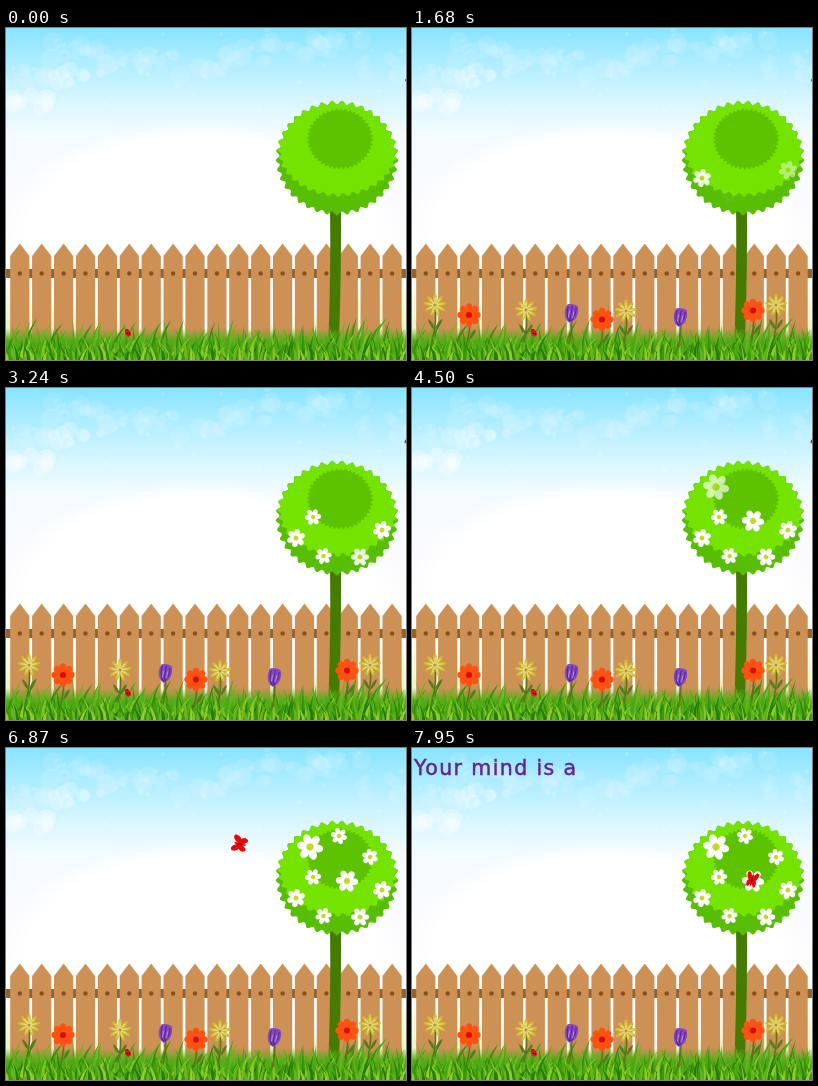
An HTML page for the animation above (8 s loop, 400 by 332 pixels).

```html
<!DOCTYPE html>
<html lang="en">
<head>
<meta charset="utf-8">
<title>Garden</title>
<style>
html, body { margin: 0; width: 100%; height: 100%; overflow: hidden; background: #fff; }
svg { display: block; width: 400px; height: 332px; }
text { font: 20.5px "DejaVu Sans", sans-serif; letter-spacing: 1.4px; fill: #662391; stroke: #662391; stroke-width: .5; white-space: pre; }
</style>
</head>
<body>
<svg viewBox="0 0 400 332" xmlns="http://www.w3.org/2000/svg">
  <defs>
    <linearGradient id="sky" x1="0" y1="0" x2="0" y2="1">
      <stop offset="0" stop-color="#88e4ff"/>
      <stop offset=".12" stop-color="#b4eeff"/>
      <stop offset=".22" stop-color="#d8f6ff"/>
      <stop offset=".32" stop-color="#f3fbff"/>
      <stop offset=".5" stop-color="#fafaff"/>
      <stop offset=".76" stop-color="#fdfefa"/>
      <stop offset=".93" stop-color="#e6f5bd"/>
    </linearGradient>
    <radialGradient id="glow">
      <stop offset=".85" stop-color="#fff"/>
      <stop offset="1" stop-color="#fff" stop-opacity="0"/>
    </radialGradient>
    <linearGradient id="soil" x1="0" y1="0" x2="0" y2="1">
      <stop offset="0" stop-color="#5cab1c" stop-opacity="0"/>
      <stop offset=".4" stop-color="#56ab18"/>
      <stop offset="1" stop-color="#3f9a0c"/>
    </linearGradient>
    <clipPath id="crownClip"><path id="crownEdge"/></clipPath>
  </defs>
  <rect width="400" height="332" fill="url(#sky)"/>
  <ellipse cx="195" cy="205" rx="205" ry="112" fill="url(#glow)"/>
  <g id="clouds" fill="#fff"></g>
  <g id="fence"></g>
  <g id="tree"></g>
  <g id="daisies"></g>
  <g id="grass"></g>
  <g id="bed"></g>
  <g id="fly">
    <g id="wings" fill="#e8080c">
      <path id="wing" d="M0 1C-1 -7 -6 -9 -8 -7C-9 -4 -7 -1 -5 0C-8 2 -7 6 -5 7C-3 7 -1 4 0 1Z"/>
      <use href="#wing" transform="scale(-1 1)"/>
    </g>
    <path d="M0 -5V5" stroke="#a80808" stroke-width="1.6" stroke-linecap="round"/>
  </g>
  <text id="words" x="2" y="26.5"></text>
</svg>
<script>
const LOOP = 8000, STEP = 30, TAU = Math.PI * 2;
const $ = id => document.getElementById(id);
const clamp = v => Math.max(0, Math.min(1, v));
const span = (t, a, b) => clamp((t - a) / (b - a));
const n1 = v => v.toFixed(1);

let seed = 11;
function rnd(a = 0, b = 1) {
  seed = (seed * 16807) % 2147483647;
  return a + (b - a) * seed / 2147483647;
}
const times = (n, fn) => Array.from({ length: n }, (_, i) => fn(i)).join('');
const dot = (x, y, r, extra = '') =>
  `<circle cx="${n1(x)}" cy="${n1(y)}" r="${n1(r)}" ${extra}/>`;

// Sky
const puff = (x, y, w, o) => times(9, () =>
  dot(x + rnd(-w, w), y + rnd(-w, w) * .4, rnd(4, 10), `opacity="${o}"`));
$('clouds').innerHTML = puff(76, 48, 28, .24) + puff(24, 73, 18, .32) +
  times(9, i => puff(20 + i * 45, rnd(14, 52), 26, .11)) +
  times(45, () => dot(rnd(0, 400), rnd(0, 95), rnd(.8, 3), 'opacity=".18"'));

// Fence
$('fence').innerHTML = '<path d="M0 241H400V250H0Z" fill="#94602c"/>' + times(18, i => {
  const x = 13.8 + i * 21.9;
  return `<path d="M${n1(x - 9.6)} 320V228L${n1(x)} 215.5L${n1(x + 9.6)} 228V320Z" fill="#cd9156"/>` +
    dot(x, 245.5, 2.2, 'fill="#85501f"');
});

// Tree
function frill(cx, cy, rx, ry, bumps, depth) {
  const n = bumps * 8;
  const at = i => {
    const a = i / n * TAU, k = depth * Math.sin(a * bumps);
    return n1(cx + Math.cos(a) * (rx + k)) + ' ' + n1(cy + Math.sin(a) * (ry + k));
  };
  return 'M' + Array.from({ length: n }, (_, i) => at(i)).join('L') + 'Z';
}
const crown = frill(331, 130, 59.5, 55.5, 37, 1.9);
$('crownEdge').setAttribute('d', crown);
$('tree').innerHTML =
  '<path d="M324 180H335Q335.5 245 332.5 325H322Q325 245 324 180Z" fill="#457b00"/>' +
  `<path d="${crown}" fill="#58bd05"/>` +
  `<path d="${frill(332, 120, 59, 47, 37, 1.8)}" fill="#75e300" clip-path="url(#crownClip)"/>` +
  `<path d="${frill(334, 111, 32, 29.5, 44, 1.2)}" fill="#5dc300"/>`;

// Daisies: x, y, radius, start of fade
const FADE = 720;
const daisies = [
  [290, 150, 9, 1050], [376, 142, 9, 1350], [317.5, 168, 8, 1650],
  [307, 129, 8, 2160], [354, 169, 9, 2610], [341, 133, 11, 3570],
  [304, 99, 13, 4020], [333, 88, 8, 4560], [364, 109, 8, 5130]
];
const petals = (n, r, w, fill) => times(n, i =>
  `<ellipse cy="${n1(-r * .62)}" rx="${n1(w)}" ry="${n1(r * .4)}" fill="${fill}" transform="rotate(${i * 360 / n})"/>`);
$('daisies').innerHTML = daisies.map(([x, y, r], i) =>
  `<g transform="translate(${x} ${y}) rotate(${10 + i * 5})">${petals(6, r, r * .31, '#fff')}` +
  dot(0, 0, r * .33, 'fill="#fff"') + dot(0, 0, r * .27, 'fill="#c9d626"') + '</g>').join('');

// Grass
function blade(x, h, lean, w, fill) {
  const y = 334, tip = `${n1(x + lean)} ${n1(y - h)}`;
  return `<path d="M${n1(x - w)} ${y}Q${n1(x - w)} ${n1(y - h * .6)} ${tip}` +
    `Q${n1(x + w)} ${n1(y - h * .5)} ${n1(x + w)} ${y}Z" fill="${fill}"/>`;
}
const row = (n, lo, hi, lean, w, fills) => times(n, i =>
  blade((i + rnd()) * 400 / n, rnd(lo, hi), rnd(-lean, lean), w, fills[i % fills.length]));
const ladybug = '<g transform="translate(122 305) rotate(-25)">' +
  dot(0, -2.5, 1.7, 'fill="#222"') + '<ellipse rx="2.6" ry="3.6" fill="#d8141c"/>' +
  dot(-1, 0, .6) + dot(1, 1.2, .6) + '</g>';
$('grass').innerHTML = '<path d="M0 300H400V332H0Z" fill="url(#soil)"/>' +
  row(150, 22, 45, 18, 1.2, ['#348f0d', '#4aa814', '#6cb321']) +
  row(150, 16, 32, 14, 1.4, ['#4bab15', '#85c427', '#2c850a']) +
  row(130, 8, 22, 10, 1.6, ['#93cc2c', '#3a970c', '#62b51b', '#237a08']) + ladybug;

// Flower bed
const stem = y =>
  `<path d="M0 0Q2 ${y / 2} -2 ${y}" fill="none" stroke="#66701c" stroke-width="1.6"/>`;
const leaf = side =>
  `<path d="M0 25Q${side * 2} 16 ${side * 7} 14Q${side * 6} 21 0 25Z" fill="#587a1d"/>`;
const kinds = {
  star: stem(32) + leaf(1) + leaf(-1) + petals(9, 11, 1.7, '#cfbe34') +
    petals(9, 8, .7, '#e9de78') + dot(0, 0, 2.8, 'fill="#e2d488"') + dot(0, 0, 1.5, 'fill="#b8962b"'),
  poppy: stem(28) + leaf(1) + petals(8, 11.5, 3.4, '#ff5212') +
    dot(0, 0, 5, 'fill="#ff5212"') + dot(0, 0, 3.1, 'fill="#d3100c"'),
  crocus: stem(30) + '<g transform="rotate(10)"><path d="M0 9C-7 6 -8 -4 -5 -9Q0 -11 5 -9C8 -4 7 6 0 9Z" fill="#8747c2"/>' +
    '<path d="M0 8V-8M-1 7Q-5 1 -4 -7M1 7Q5 1 4 -7" fill="none" stroke="#54298c" stroke-width="1.1"/>' +
    '<path d="M-2 4V-3M2.3 4V-3" stroke="#b98be0" stroke-width=".9"/></g>'
};
const bed = [
  ['star', 23, 277], ['poppy', 57, 287], ['star', 114, 282], ['crocus', 159, 286],
  ['poppy', 190, 291.5], ['star', 214, 283], ['crocus', 268, 290],
  ['poppy', 341, 282.5], ['star', 364, 277]
];
$('bed').innerHTML = bed.map(([kind, x, y]) =>
  `<g transform="translate(${x} ${y})">${kinds[kind]}</g>`).join('');

// Butterfly: curved legs with an easing power and the headings at both ends
const legs = [
  { t0: 5910, t1: 6870, x: [408, 318, 234], y: [50, 58, 96], turn: [-70, -75], pow: 1.4 },
  { t0: 6870, t1: 7770, x: [234, 272, 337], y: [96, 78, 141], turn: [-75, 70], pow: 1 },
  { t0: 7770, t1: 7920, x: [337, 340, 340], y: [141, 138, 132], turn: [70, 15], pow: 1 }
];
const bend = ([a, b, c], u) => a * (1 - u) ** 2 + 2 * b * u * (1 - u) + c * u * u;

function flyTo(t) {
  const leg = legs.find(l => t < l.t1) || legs[legs.length - 1];
  const u = 1 - (1 - span(t, leg.t0, leg.t1)) ** leg.pow;
  const turn = leg.turn[0] + (leg.turn[1] - leg.turn[0]) * u;
  const flap = .85 + .15 * Math.cos((t - 6870) / 240 * TAU);
  $('fly').setAttribute('transform',
    `translate(${bend(leg.x, u).toFixed(2)} ${bend(leg.y, u).toFixed(2)}) rotate(${n1(turn)})`);
  $('wings').setAttribute('transform', `scale(${flap.toFixed(3)} 1)`);
}

const phrase = 'Your mind is a';
const daisyEls = [...$('daisies').children];

function draw(t) {
  const rise = 62.5 * (1 - span(t, 60, 750));
  $('bed').setAttribute('transform', `translate(0 ${rise.toFixed(2)})`);
  $('bed').setAttribute('opacity', span(t, 60, 200).toFixed(3));
  daisyEls.forEach((el, i) => {
    const start = daisies[i][3];
    el.setAttribute('opacity', span(t, start, start + FADE).toFixed(3));
  });
  flyTo(t);
  $('words').textContent = phrase.slice(0, Math.max(0, Math.floor((t - 7530) / STEP) + 1));
}

function tick() {
  draw(performance.now() % LOOP);
  requestAnimationFrame(tick);
}
tick();
</script>
</body>
</html>
```
